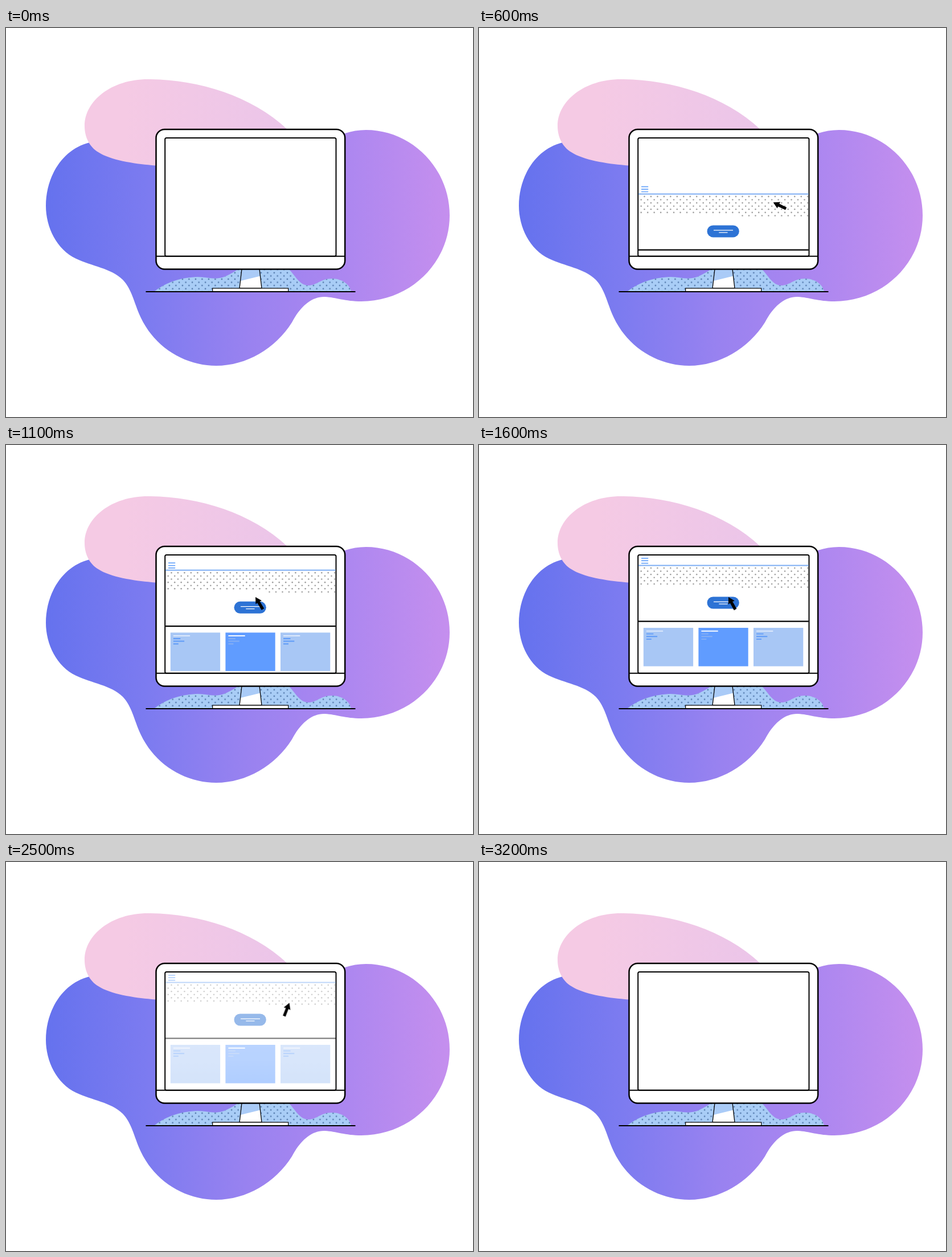
Recreate the animation shown at these times as an HTML page. Size 820 by 683 pixels, loop 3.3 s.

```html
<!DOCTYPE html>
<html lang="en">
<head>
<meta charset="utf-8">
<title>Web page on a monitor</title>
<style>
  html, body { margin: 0; width: 100%; height: 100%; overflow: hidden; background: #fff; }
  svg { display: block; width: 820px; height: 683px; }
</style>
</head>
<body>
<svg viewBox="0 0 820 683">
  <defs>
    <linearGradient id="violet" gradientUnits="userSpaceOnUse" x1="70" x2="779" y1="0" y2="0">
      <stop offset="0" stop-color="#6572ee"/>
      <stop offset=".25" stop-color="#7c7bf0"/>
      <stop offset=".5" stop-color="#9982f0"/>
      <stop offset=".75" stop-color="#ad87f0"/>
      <stop offset="1" stop-color="#c58fee"/>
    </linearGradient>
    <linearGradient id="pink" gradientUnits="userSpaceOnUse" x1="138" x2="494" y1="0" y2="0">
      <stop offset=".2" stop-color="#f5cae4"/>
      <stop offset="1" stop-color="#ebc5e9"/>
    </linearGradient>
    <linearGradient id="veil" x1="0" x2="0" y1="0" y2="1">
      <stop offset="0" stop-color="#fff" stop-opacity=".12"/>
      <stop offset=".4" stop-color="#fff" stop-opacity=".1"/>
      <stop offset="1" stop-color="#fff" stop-opacity="0"/>
    </linearGradient>
    <pattern id="hillDots" patternUnits="userSpaceOnUse" x="261" y="427" width="11.5" height="11.2">
      <g fill="#567cae">
        <circle cx="2.9" cy="2.8" r="1.35"/>
        <circle cx="8.65" cy="8.4" r="1.35"/>
      </g>
    </pattern>
    <clipPath id="screen"><rect x="280" y="194" width="298.7" height="206"/></clipPath>
    <path id="hills" d="M260 463C283 445 308 438 337 437C352 437 366 443 383 437C396 432 402 426 412 422H495C506 431 513 450 529 452C545 453 552 440 572 440C591 440 604 451 606 463Z"/>
  </defs>

  <path fill="url(#violet)" d="M147 201C100 212 70 260 70 312C70 350 89 389 123 405C150 418 185 422 205 442C221 459 224 480 236 507C262 563 316 593 369 593C422 593 473 563 502 517C515 492 535 471 560 472C580 473 595 480 624 480C710 480 779 412 779 329C779 246 712 179 632 179C619 179 607 181 595 185L300 220Z"/>
  <path fill="url(#pink)" d="M494 178C430 118 335 90 249 90C185 90 138 128 138 172C138 192 147 209 162 218C185 233 230 239 263 241.5L320 245Z"/>

  <use href="#hills" fill="#a9cdf6"/>
  <use href="#hills" fill="url(#hillDots)"/>
  <path fill="#fff" d="M414 423H445L449 457H410Z"/>
  <path fill="#aacbf7" d="M414 423H445L446.5 435.5L411.7 444Z"/>
  <g stroke="#000" fill="none">
    <path stroke-width="1.3" d="M414 423L410 457H449L445 423"/>
    <rect x="362.7" y="457" width="133" height="6" fill="#fff" stroke-width="1.2"/>
    <path stroke-width="1.8" d="M245.5 463H613.5"/>
    <rect x="263.5" y="178" width="331.7" height="245.5" rx="15" fill="#fff" stroke-width="2.5"/>
    <rect x="279.2" y="193" width="300.3" height="207.8" rx="2.5" stroke-width="2"/>
    <path stroke-width="2" d="M263.5 400.8H595"/>
  </g>

  <g clip-path="url(#screen)">
    <g id="page">
      <path stroke="#6aa5fa" stroke-width="1.7" d="M285 198.8H297.2M285 203.2H297.2M285 207.6H297.2"/>
      <path stroke="#7eaef4" stroke-width="2" d="M280 211.5H579"/>
      <g id="dots" fill="#a0a0a0"></g>
      <rect x="400.5" y="266.5" width="56.3" height="21" rx="10.5" fill="#2d73d5"/>
      <path stroke="#fff" stroke-width="1.2" d="M412 275.3H446M421.3 279.2H436.5"/>
      <path stroke="#000" stroke-width="2.2" d="M280 309.7H579"/>
      <g id="cards"></g>
    </g>
  </g>
  <path id="cursor" d="M0 0L11 -6.2L10.5 -2.6H25V2.6H10.5L11 6.2Z"/>
</svg>

<script>
const LOOP = 3300, STEP = 100;
const el = id => document.getElementById(id);
const page = el('page'), cursor = el('cursor');

// Staggered dots; the last row fills only the right part.
const PITCH = 11.47, ROWS = 7;
let dots = '';
for (let row = 0; row < ROWS; row++) {
  const left = row === ROWS - 1 ? 460 : 280;
  for (let x = 279 + (row % 2) * PITCH / 2; x < 579; x += PITCH) {
    if (x > left) dots += `<circle cx="${x}" cy="${216 + row * 5.6}" r="1.3"/>`;
  }
}
el('dots').innerHTML = dots;

const card = (x, fill, title, text) => `
  <g transform="translate(${x} 321)" stroke-width="1.9">
    <rect width="87.3" height="67.5" fill="${fill}"/>
    <path stroke="${title}" d="M5 5.7H34.3"/>
    <path stroke="${text}" d="M5 10.6H17.5M5 15.2H24.3M5 19.9H14"/>
    <rect class="veil" width="87.3" height="67.5" fill="url(#veil)"/>
  </g>`;
el('cards').innerHTML =
  card(288.8, '#a8c7f5', '#e0ebfc', '#5e9bf8') +
  card(385.4, '#609cff', '#fff', '#86aff3') +
  card(482, '#a8c7f5', '#e0ebfc', '#5e9bf8');
const veils = document.querySelectorAll('.veil');

const ramp = (t, from, to) => Math.min(1, Math.max(0, (t - from) / (to - from)));
const ease = (t, from, to) => (1 - Math.cos(Math.PI * ramp(t, from, to))) / 2;

function place(node, x, y, turn, opacity) {
  node.setAttribute('transform', `translate(${x} ${y}) rotate(${turn})`);
  node.setAttribute('opacity', opacity);
}

function draw(t) {
  // The page slides up, rests, then fades.
  const slide = 208 * (1 - ramp(t, 0, 1230)) ** 1.43;
  place(page, 0, slide, 0, 1 - ease(t, 1800, 3200));
  veils.forEach(v => v.setAttribute('opacity', ramp(t, 2000, 2500)));

  // The cursor glides to the button, then swings away to the right.
  const arrive = ease(t, 240, 1050);
  const swing = ease(t, 1900, 2700);
  const leave = ramp(t, 2080, 3100) ** 1.1;
  const x = 572 - 134 * arrive + 158 * leave;
  const y = 334 - 67 * arrive - 23 * swing;
  const turn = 26 + 35 * ease(t, 600, 1200) + 59 * swing;
  place(cursor, x, y, turn, Math.min(ramp(t, 0, 500), 1 - ramp(t, 2900, 3200)));
}

const begin = performance.now();
function tick() {
  const t = (performance.now() - begin) % LOOP;
  draw(Math.floor(t / STEP) * STEP);
  requestAnimationFrame(tick);
}
tick();
</script>
</body>
</html>
```
